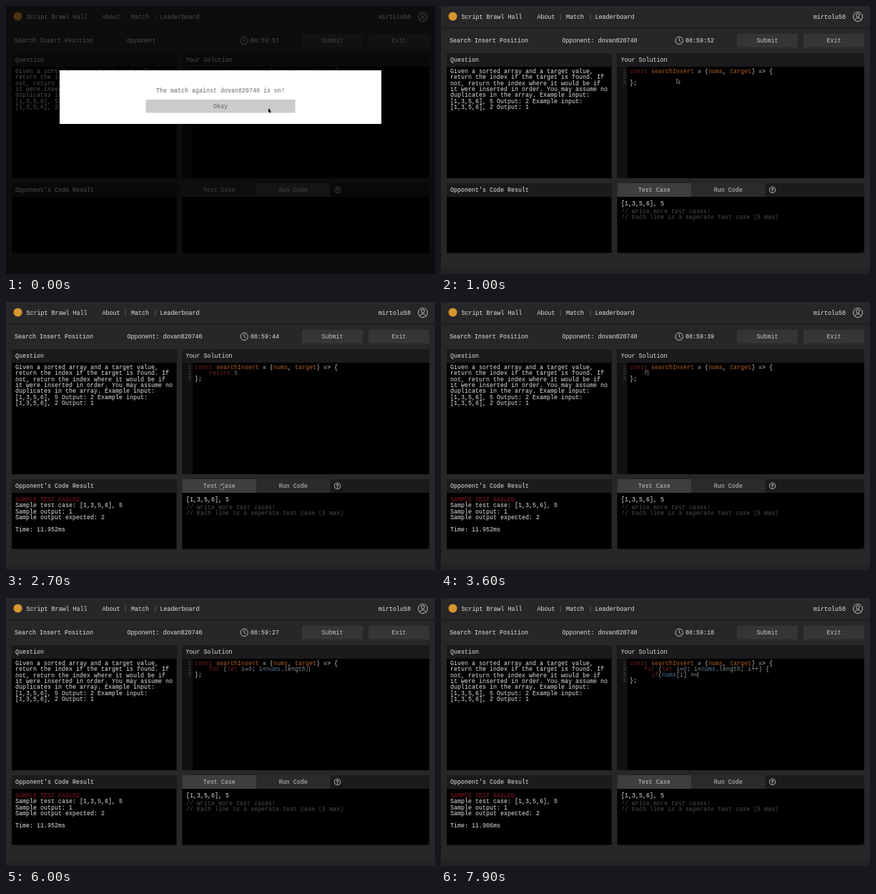
Animation, 600 px wide and 375 px high, one loop 8 s. Source, as an HTML page with a canvas:

```html
<!DOCTYPE html>
<html lang="en">
<head>
<meta charset="utf-8">
<title>Code match</title>
<style>
  html, body { margin: 0; width: 100%; height: 100%; overflow: hidden; background: #272629; }
  canvas { display: block; width: 600px; height: 375px; }
</style>
</head>
<body>
<canvas id="stage"></canvas>
<script>
const LOOP = 8000, STEP = 100, CHAR = 5, LINE = 8.3;
const canvas = document.getElementById('stage');
const ratio = window.devicePixelRatio || 1;
canvas.width = 600 * ratio;
canvas.height = 375 * ratio;
const ctx = canvas.getContext('2d');
ctx.scale(ratio, ratio);

const BRAND = 'Script Brawl Hall', PLAYER = 'mirtolu58', RIVAL = 'dovan820740';
const WHITE = '#e4e4e4', HEADER = '#1b1a1c', BUTTON = '#353437';
const IDLE = '#2b2a2d', ACTIVE = '#3e3d40', LABEL = '#c4c4c4';
const FONT = '8.333px "Liberation Mono", monospace';

const QUESTION = [
  'Given a sorted array and a target value,',
  'return the index if the target is found. If',
  'not, return the index where it would be if',
  'it were inserted in order. You may assume no',
  'duplicates in the array. Example input:',
  '[1,3,5,6], 5 Output: 2 Example input:',
  '[1,3,5,6], 2 Output: 1'
];
const FIRST_TRY = 'return 5';
const SECOND_TRY = 'for (let i=0; i<nums.length; i++) {\n  if(nums[i] >=';

// Keys are [time, value, ...]; values are interpolated linearly.
const FIRST_KEYS = [[1100, 0], [1600, 8], [3100, 8], [3400, 0]];
const SECOND_KEYS = [[3500, 0], [3600, 1], [4500, 3], [5100, 16], [5500, 22],
  [6400, 34], [6500, 35], [6600, 38], [6900, 41], [7900, 51]];
const MOUSE_KEYS = [[300, 367, 143], [700, 300, 256], [800, 300, 256], [1000, 330, 102],
  [1700, 345, 135], [1900, 376, 220], [2200, 398, 256], [2500, 398, 256],
  [2700, 300, 256], [2850, 300, 256], [3100, 326, 102]];

function sample(keys, time, column = 1) {
  if (time <= keys[0][0]) return keys[0][column];
  for (let k = 1; k < keys.length; k++) {
    const a = keys[k - 1], b = keys[k];
    if (time <= b[0]) return a[column] + (b[column] - a[column]) * (time - a[0]) / (b[0] - a[0]);
  }
  return keys[keys.length - 1][column];
}
const count = (keys, time) => Math.floor(sample(keys, time) + 1e-6);
const between = (time, from, to) => time >= from && time < to;

function rect(x, y, w, h, color) {
  ctx.fillStyle = color;
  ctx.fillRect(x, y, w, h);
}
function text(str, x, middle, color = WHITE, align = 'left') {
  ctx.fillStyle = color;
  ctx.textAlign = align;
  ctx.fillText(str, x, middle + 2.6);
}
function lines(list, x, y, color) {
  list.forEach((str, i) => text(str, x, y + i * LINE, color));
}
function stroke(path, color = WHITE, width = 0.8) {
  ctx.strokeStyle = color;
  ctx.lineWidth = width;
  ctx.stroke(new Path2D(path));
}
function circle(x, y, r, color = WHITE, filled = false) {
  ctx.beginPath();
  ctx.arc(x, y, r, 0, 2 * Math.PI);
  ctx.fillStyle = ctx.strokeStyle = color;
  ctx.lineWidth = 0.8;
  filled ? ctx.fill() : ctx.stroke();
}
function button(label, x, y, w, h, color, textColor = LABEL) {
  rect(x, y, w, h, color);
  text(label, x + w / 2, y + h / 2, textColor, 'center');
}
function panel(title, x, y, w, h) {
  rect(x, y, w, h, '#000');
  rect(x, y, w, 19, HEADER);
  text(title, x + 5, y + 9.3);
}

function drawNav() {
  rect(0, 0, 600, 375, '#272629');
  const shade = ctx.createLinearGradient(0, 30, 0, 34);
  shade.addColorStop(0, '#1c1b1e');
  shade.addColorStop(1, '#272629');
  rect(0, 30, 600, 4, shade);
  rect(0, 0, 600, 30, '#272629');
  rect(0, 369.5, 600, 5.5, '#222124');
  circle(16.5, 14.5, 6, '#d8962f', true);
  text(BRAND, 28.5, 15);
  text('About', 134.5, 15);
  text('|', 164.5, 15, '#77767a');
  text('Match', 175, 15);
  text('|', 206.5, 15, '#77767a');
  text('Leaderboard', 215.5, 15);
  text(PLAYER, 521, 15);
  circle(583, 15, 6.5);
  circle(583, 13, 2.3);
  stroke('M578.7 19.7C579.2 15.7 586.8 15.7 587.3 19.7');
}

function drawMatchBar(time) {
  text('Search Insert Position', 12, 48);
  text(time < 200 ? 'Opponent' : 'Opponent: ' + RIVAL, 169.5, 48);
  const seconds = 56 - Math.floor((time - 200) / 200 + 0.2);
  circle(333.2, 48.4, 5.2);
  stroke('M333.2 45V48.7L335.6 50.4');
  text('00:59:' + seconds, 342, 48);
  button('Submit', 414, 39, 85, 19, BUTTON);
  button('Exit', 507, 39, 85, 19, BUTTON);
}

function tokenColor(token, inBody) {
  if (/^(const|return|for|let|if)$/.test(token)) return '#752222';
  if (/^\d/.test(token)) return '#6f6c80';
  if (token === 'length') return '#87928a';
  if (/^(nums|target|searchInsert)$/.test(token)) return inBody ? '#507a9b' : '#ad5f28';
  if (/^\w+$/.test(token)) return '#7d8a8c';
  return inBody ? '#a3a2a1' : '#cfcecd';
}
function drawCode(str, x, y, inBody) {
  for (const match of str.matchAll(/\w+|[^\w\s]+/g))
    text(match[0], x + match.index * CHAR, y, tokenColor(match[0], inBody));
}

function drawSolution(time) {
  panel('Your Solution', 246.5, 66, 345.5, 175);
  rect(246.5, 85, 14.5, 156, '#111012');
  const typed = time < 3500
    ? FIRST_TRY.slice(0, count(FIRST_KEYS, time))
    : SECOND_TRY.slice(0, count(SECOND_KEYS, time));
  const body = typed.split('\n');
  const rowY = row => 91 + row * 8.2;
  drawCode('const searchInsert = (nums, target) => {', 264, rowY(0), false);
  body.forEach((str, i) => drawCode(str, 284, rowY(i + 1), true));
  drawCode('};', 264, rowY(body.length + 1), false);
  for (let row = 0; row < body.length + 2; row++)
    text(row + 1, 259, rowY(row), '#454447', 'right');
  if (between(time, 1100, 1700) || time >= 3200) {
    const last = body.length - 1;
    rect(284 + body[last].length * CHAR, rowY(last + 1) - 4, 0.6, 8, '#b0b0b0');
  }
}

function drawOpponent(time) {
  panel('Opponent\'s Code Result', 8, 248, 230.5, 97.5);
  if (time < 1500) return;
  text('SAMPLE TEST FAILED', 13, 276.5, '#8a1720');
  lines([
    'Sample test case: [1,3,5,6], 5',
    'Sample output: 1',
    'Sample output expected: 2',
    '',
    `Time: 11.9${time < 7600 ? '52' : '06'}ms`
  ], 13, 284.8);
}

function drawHelpIcon() {
  circle(463.5, 257.3, 4.1);
  ctx.font = 'bold 6.5px "Liberation Mono", monospace';
  text('?', 463.5, 256.9, WHITE, 'center');
  ctx.font = FONT;
}

function drawTests(time) {
  const running = time < 700 || between(time, 2200, 2700);
  rect(246.5, 248, 345.5, 97.5, '#000');
  rect(246.5, 248, 345.5, 19, HEADER);
  button('Test Case', 246.5, 248, 103.5, 19, running ? IDLE : ACTIVE);
  button('Run Code', 350, 248, 103.5, 19, running ? ACTIVE : IDLE);
  drawHelpIcon();
  if (time < 200) return;
  if (running) {
    lines([
      'Write the code in JavaScript and try out different test cases to',
      'see the result.'
    ], 252, 276.5, '#747474');
  } else {
    text('[1,3,5,6], 5', 252, 276.5);
    lines([
      '// Write more test cases!',
      '// Each line is a seperate test case (5 max)'
    ], 252, 287, '#4c4c4c');
    stroke('M588 344.5L591 341.5M590 344.5L591 343.5', '#555', 0.5);
  }
}

function drawDialog() {
  rect(0, 0, 600, 375, 'rgba(0,0,0,.66)');
  rect(75, 90, 450, 75, '#fff');
  text(`The match against ${RIVAL} is on!`, 300, 118.3, '#666', 'center');
  button('Okay', 195.5, 131, 209, 18.5, '#cbcbcb', '#666');
}

function drawMouse(time) {
  if (between(time, 1200, 1700) || time >= 3200) return;
  ctx.save();
  ctx.translate(sample(MOUSE_KEYS, time, 1), sample(MOUSE_KEYS, time, 2));
  const arrow = 'M0 0V6L1.3 4.8L2.3 7L3.3 6.5L2.4 4.4H4.2Z';
  ctx.lineJoin = 'round';
  stroke(arrow, '#ddd', 1);
  ctx.fillStyle = '#000';
  ctx.fill(new Path2D(arrow));
  ctx.restore();
}

function render(now) {
  const time = Math.floor(now % LOOP / STEP) * STEP;
  ctx.font = FONT;
  drawNav();
  drawMatchBar(time);
  panel('Question', 8, 66, 230.5, 175);
  lines(QUESTION, 13, 91.5);
  drawSolution(time);
  drawOpponent(time);
  drawTests(time);
  if (time < 200) drawDialog();
  drawMouse(time);
}

const start = performance.now();
function tick() {
  render(performance.now() - start);
  requestAnimationFrame(tick);
}
tick();
</script>
</body>
</html>
```
